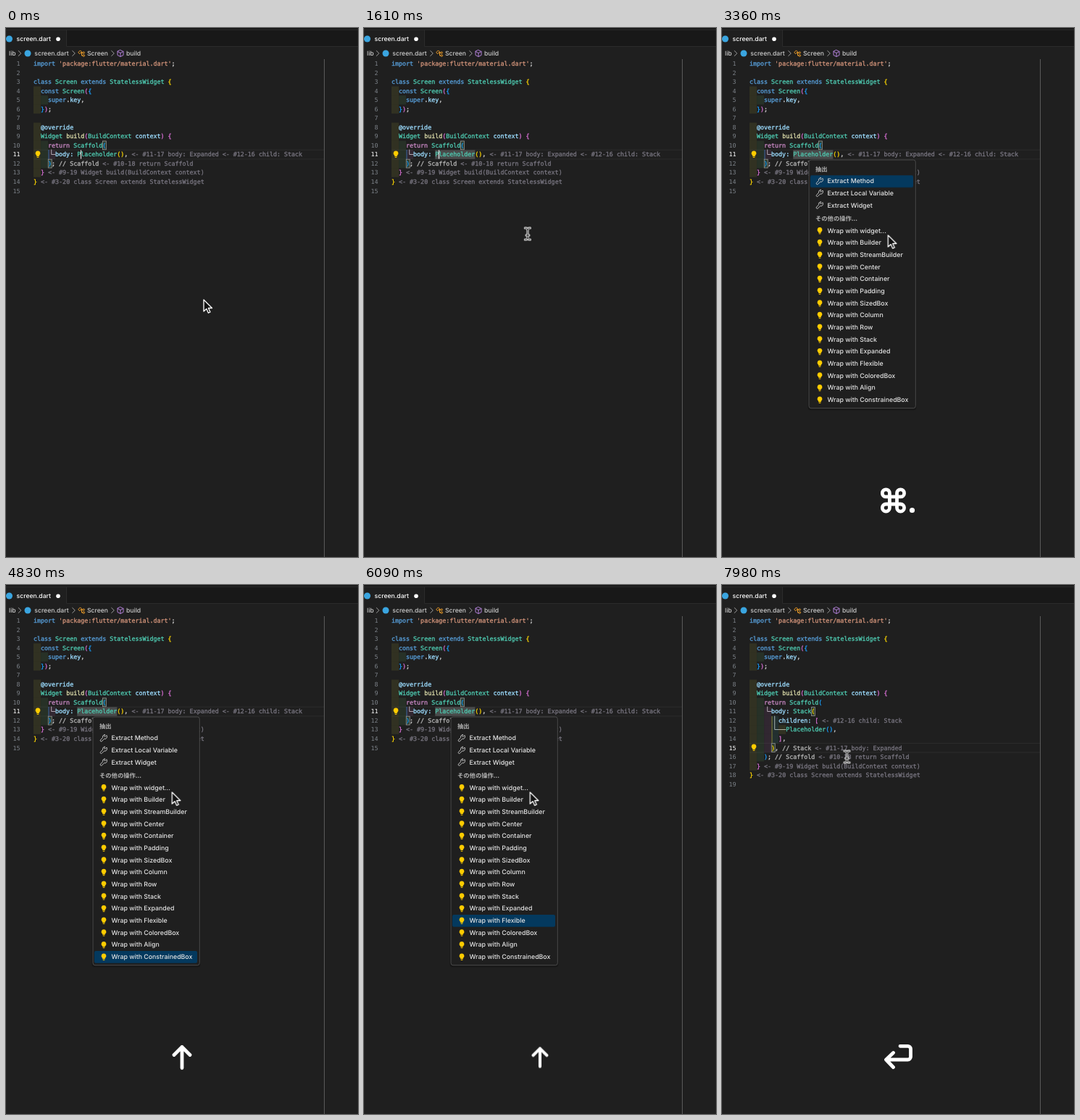
Recreate the animation shown at these times as an HTML page. Size 486 px wide and 730 px high, loop 8 s.

```html
<!DOCTYPE html>
<html lang="en">
<head>
<meta charset="utf-8">
<title>Code editor: wrap with widget</title>
<style>
html, body { margin: 0; width: 100%; height: 100%; overflow: hidden; background: #1f1f1f; }
svg { display: block; width: 486px; height: 730px; }
text { white-space: pre; text-rendering: geometricPrecision; }
.code text { font: 8.33px "DejaVu Sans Mono", "Liberation Mono", monospace; stroke-width: .32px; }
.ui { font: 500 8.65px Inter, "Noto Sans", sans-serif; fill: #ccc; }
.menu text { font: 500 8.8px Inter, "Noto Sans", sans-serif; fill: #e6e6e6; }
.menu .head { font: 700 8.3px "Noto Sans CJK JP", "Noto Sans CJK", sans-serif; fill: #b4b4b4; }
.line { fill: none; stroke-linecap: round; stroke-linejoin: round; }
.key { stroke: #fff; stroke-width: 4.8; }

.before, .after, .bulb-late, .word, .caret, .menu, .pick, .cmd, .up, .enter, .arrow, .beam {
  animation: 8s step-end infinite;
}
.before { animation-name: before; }
.after { animation-name: after; }
.bulb-late { animation-name: bulb; }
.word { animation-name: word; }
.caret { animation-name: caret; }
.menu { animation-name: menu; }
.pick { animation-name: pick; }
.cmd { animation-name: cmd; }
.up { animation-name: up; }
.enter { animation-name: enter; }
.arrow { animation-name: arrow; }
.beam { animation-name: beam; }
.mouse { animation: mouse 8s ease-in-out infinite; }
.press { animation: press 8s linear infinite; transform-origin: 243px 652px; }

@keyframes before { 0% { visibility: visible } 90.1%, to { visibility: hidden } }
@keyframes after { 0% { visibility: hidden } 90.1%, to { visibility: visible } }
@keyframes bulb { 0% { visibility: hidden } 95.35%, to { visibility: visible } }
@keyframes word { 0% { visibility: hidden } 12.2% { visibility: visible } 90.1%, to { visibility: hidden } }
@keyframes caret {
  0% { opacity: 1 } 6.1% { opacity: 0 } 10.5% { opacity: 1 } 25.3% { opacity: 0 }
  31.45% { opacity: 1 } 37.6%, to { opacity: 0 }
}
@keyframes menu { 0% { visibility: hidden } 39.3% { visibility: visible } 90.1%, to { visibility: hidden } }
@keyframes pick {
  0% { transform: translateY(211.3px) }
  60.3% { transform: translateY(513px) }
  68.2% { transform: translateY(496.3px) }
  72.1% { transform: translateY(479.7px) }
  75.6% { transform: translateY(463px) }
  79.6% { transform: translateY(446.3px) }
  83.6%, to { transform: translateY(429.6px) }
}
@keyframes press {
  0%, 68.1%, 70.2%, 72%, 74.1%, 75.5%, 77.6%, 79.5%, 81.6%, 83.5%, 85.6%, to { transform: scale(1) }
  68.2%, 72.1%, 75.6%, 79.6%, 83.6% { transform: scale(.8) }
}
@keyframes cmd { 0% { opacity: 0 } 37.6% { opacity: 1 } 51.6% { opacity: .4 } 52.4%, to { opacity: 0 } }
@keyframes up { 0% { opacity: 0 } 60.3% { opacity: 1 } 89.2%, to { opacity: 0 } }
@keyframes enter { 0% { opacity: 0 } 89.2%, to { opacity: 1 } }
@keyframes arrow {
  0% { visibility: visible } 1.7% { visibility: hidden }
  39.3% { visibility: visible } 90.1%, to { visibility: hidden }
}
@keyframes beam {
  0% { visibility: hidden } 1.7% { visibility: visible }
  39.3% { visibility: hidden } 90.1%, to { visibility: visible }
}
@keyframes mouse {
  0%, .4% { transform: translate(273px, 375px) }
  10.5%, 13.9% { transform: translate(113px, 166.5px) }
  21%, 95.3% { transform: translate(229.3px, 286px) }
  99.7%, to { transform: translate(172.5px, 235.5px) }
}
</style>
</head>
<body>
<svg viewBox="0 0 486 730">
  <defs>
    <g id="bulb">
      <path d="M0-4.4a3.4 3.4 0 0 1 1.8 6.3v1.3h-3.6V1.9a3.4 3.4 0 0 1 1.8-6.3z" fill="#fc0"/>
      <path d="M-1.3 4.4h2.6" stroke="#fc0" stroke-width="1"/>
    </g>
    <path id="wrench" class="line" stroke="#c5c5c5" stroke-width="1"
      d="M3.6-3.7L1.5-1.6.2-3 2-4.7A3 3 0 0 0-1.4-.9L-4.6 2.6a1.3 1.3 0 0 0 1.8 1.8L.6 1A3 3 0 0 0 4.4-2.6z"/>
    <path id="chevron" class="line" stroke="#aaa" stroke-width=".9" d="M-1.8-3.5L1.8 0-1.8 3.5"/>
    <path id="ibeam" d="M-3.5-6.5Q0-6.5 0-4V7Q0 9.5-3.5 9.5M3.5-6.5Q0-6.5 0-4M3.5 9.5Q0 9.5 0 7M-2 3.5H2"/>
  </defs>

  <rect width="486" height="730" fill="#1f1f1f"/>
  <rect width="486" height="26" fill="#181818"/>
  <rect y="2" width="486" height="1" fill="#2b2b2b"/>
  <path d="M83.5 3V25.5H486" fill="none" stroke="#2b2b2b"/>
  <rect y="3" width="83" height="23" fill="#1f1f1f"/>
  <circle cx="4.5" cy="15" r="4.5" fill="#3aa5e0"/>
  <text class="ui" x="14.6" y="18.2" style="fill:#fff">screen.dart</text>
  <circle cx="72" cy="15.3" r="2.8" fill="#fff"/>

  <g class="ui">
    <text x="4" y="38">lib</text>
    <text x="39.3" y="38">screen.dart</text>
    <text x="112" y="38">Screen</text>
    <text x="166" y="38">build</text>
  </g>
  <circle cx="30" cy="35" r="4.5" fill="#3aa5e0"/>
  <use href="#chevron" x="19" y="35"/>
  <use href="#chevron" x="93.5" y="35"/>
  <use href="#chevron" x="147.5" y="35"/>
  <path class="line" stroke="#ee9d28" stroke-width="1"
    d="M100 33.5l2.5-2.6 2 2-2.5 2.6zM103.5 34h2.5M104.5 34v4h2M106 34l1.3-1.4 1.3 1.4-1.3 1.4zM106.2 38l1.3-1.4 1.3 1.4-1.3 1.4z"/>
  <path class="line" stroke="#b180d7" stroke-width="1"
    d="M158 30.5l4 2v5l-4 2-4-2v-5zM154 32.5l4 2 4-2M158 34.5v5"/>

  <rect x="439" y="43" width="1" height="687" fill="#5a5a5a"/>

  <g class="code before">
    <path d="M38 168.2H439M38 180.9H439" stroke="#2c2c2c"/>
    <rect class="word" x="98.2" y="168.4" width="55.2" height="12.4" fill="#494b4b"/>
    <path d="M59 168V181" stroke="#2f7fb8" stroke-width=".8"/>
    <path class="line" d="M62.7 168V174.5H68" stroke="#aaa" stroke-width="1"/>
    <g fill="#2b3a2b" stroke="#999" stroke-width=".8">
      <rect x="133.4" y="156" width="4.9" height="11.8"/>
      <rect x="58.3" y="181.2" width="4.9" height="11.8"/>
    </g>
    <g id="codeBefore"></g>
    <use href="#bulb" x="44" y="174"/>
    <rect class="caret" x="102.9" y="168.4" width="1.2" height="12.2" fill="#ddd"/>
  </g>

  <g class="code after">
    <path d="M38 218.4H439M38 231H439" stroke="#2c2c2c"/>
    <path d="M69 181V218" stroke="#a8912a" stroke-width=".8"/>
    <path class="line" d="M62.7 168V174.5H68M72.7 181V199.5H88" stroke="#aaa" stroke-width="1"/>
    <g fill="#2b3a2b" stroke="#999" stroke-width=".8">
      <rect x="123.4" y="168.6" width="4.9" height="11.8"/>
      <rect x="68.3" y="218.7" width="4.9" height="11.8"/>
    </g>
    <g id="codeAfter"></g>
    <use class="bulb-late" href="#bulb" x="44" y="224"/>
  </g>

  <g class="menu" id="menu">
    <rect x="118.5" y="182.5" width="150" height="345" rx="4" fill="#000" opacity=".25"/>
    <rect x="120" y="182" width="147.3" height="342.7" rx="3" fill="#1f1f1f" stroke="#4a4a4a"/>
    <rect class="pick" x="122" y="-8" width="142" height="16.8" rx="2" fill="#04395e"/>
    <text class="head" x="129" y="198">抽出</text>
    <text class="head" x="129" y="266">その他の操作...</text>
  </g>

  <g class="line key">
    <g class="cmd">
      <path transform="translate(216.3 631.8) scale(1.68)" stroke-width="2.85"
        d="M9 9h6v6H9zM9 9H6a3 3 0 1 1 3-3zM15 9V6a3 3 0 1 1 3 3zM15 15h3a3 3 0 1 1-3 3zM9 15v3a3 3 0 1 1-3-3z"/>
      <circle cx="262.5" cy="665.5" r="3.6" fill="#fff" stroke="none"/>
    </g>
    <g class="up">
      <path class="press" d="M243 666.5V637.5M232 648.5L243 637.5 254 648.5"/>
    </g>
    <path class="enter" d="M246 636.3H256.5a4 4 0 0 1 4 4V651a4 4 0 0 1-4 4H227.5M236.5 645.5L226.5 655 236.5 665.5"/>
  </g>

  <g class="mouse">
    <path class="arrow" d="M0 0V16L3.8 12.5 6.4 18.2 9 17 6.4 11.5H11.5z" fill="#111" stroke="#fff" stroke-width="1.3" stroke-linejoin="round"/>
    <g class="beam line">
      <use href="#ibeam" stroke="#fff" stroke-width="3"/>
      <use href="#ibeam" stroke="#111" stroke-width="1"/>
    </g>
  </g>
</svg>

<script>
const NS = 'http://www.w3.org/2000/svg';
const LEFT = 38, CHAR = 5.015, ROW = 12.53, TOP = 49.2;

function add(parent, tag, attrs, text) {
  const el = document.createElementNS(NS, tag);
  for (const name in attrs) el.setAttribute(name, attrs[name]);
  if (text !== undefined) el.textContent = text;
  return parent.appendChild(el);
}

const head = `import 'package:flutter/material.dart';

class Screen extends StatelessWidget {
  const Screen({
    super.key,
  });

  @override
  Widget build(BuildContext context) {
    return Scaffold(
`;
const tail = `    ); // Scaffold <- #10-18 return Scaffold
  } <- #9-19 Widget build(BuildContext context)
} <- #3-20 class Screen extends StatelessWidget
`;
const bodyBefore = `      body: Placeholder(), <- #11-17 body: Expanded <- #12-16 child: Stack
`;
const bodyAfter = `      body: Stack(
        children: [ <- #12-16 child: Stack
          Placeholder(),
        ],
      ), // Stack <- #11-17 body: Expanded
`;

// Token pattern, paired with a colour; a null colour means bracket depth.
const rules = [
  ["'[^']*'", '#ce9178'],
  ['<- .*$', '#77747f'],
  ['// \\w+', '#b4b4b4'],
  ['\\b(?:import|class|extends|const|super)\\b', '#569cd6'],
  ['\\breturn\\b', '#c586c0'],
  ['\\bbuild\\b', '#dcdcaa'],
  ['[A-Z]\\w*', '#4ec9b0'],
  ['@?\\w+:?', '#9cdcfe'],
  ['[()\\[\\]{}]', null],
  ['.', '#d4d4d4']
];
const lexer = new RegExp(rules.map(r => `(${r[0]})`).join('|'), 'g');
const bracketColors = ['#ffd700', '#da70d6', '#179fff'];
const tints = ['255,255,64', '127,255,127', '255,127,255', '79,236,236'];

function drawCode(id, source, active) {
  const group = document.getElementById(id);
  let depth = 0;
  source.split('\n').forEach((line, i) => {
    const y = TOP + i * ROW, indent = line.search(/\S|$/);
    for (let k = 0; k < indent / 2; k++) {
      add(group, 'rect', {
        x: LEFT + k * 2 * CHAR, y: y - ROW / 2, width: 2 * CHAR, height: ROW,
        fill: `rgba(${tints[k % 4]},.08)`
      });
    }
    const on = i + 1 === active;
    add(group, 'text', {
      x: 19.5, y: y + 2.9, 'text-anchor': 'end', fill: on ? '#fff' : '#7b8087',
      'font-weight': on ? 700 : 400
    }, i + 1);
    const text = add(group, 'text', { x: LEFT + indent * CHAR, y: y + 2.9 });
    for (const match of line.trim().matchAll(lexer)) {
      const token = match[0];
      let color = rules[match.slice(1).findIndex(part => part !== undefined)][1];
      if (!color) {
        const opens = '([{'.includes(token);
        if (!opens) depth--;
        color = bracketColors[depth % 3];
        if (opens) depth++;
      }
      add(text, 'tspan', { fill: color, stroke: color }, token);
    }
  });
}

drawCode('codeBefore', head + bodyBefore + tail, 11);
drawCode('codeAfter', head + bodyAfter + tail, 15);

const menu = document.getElementById('menu');
function menuItem(label, icon, y) {
  add(menu, 'use', { href: icon, x: 135, y });
  add(menu, 'text', { x: 145.5, y: y + 3.1 }, label);
}
['Method', 'Local Variable', 'Widget'].forEach((name, i) =>
  menuItem('Extract ' + name, '#wrench', 211.3 + i * 16.68));
('widget... Builder StreamBuilder Center Container Padding SizedBox Column Row Stack ' +
 'Expanded Flexible ColoredBox Align ConstrainedBox').split(' ').forEach((name, i) =>
  menuItem('Wrap with ' + name, '#bulb', 279.5 + i * 16.68));
</script>
</body>
</html>
```
